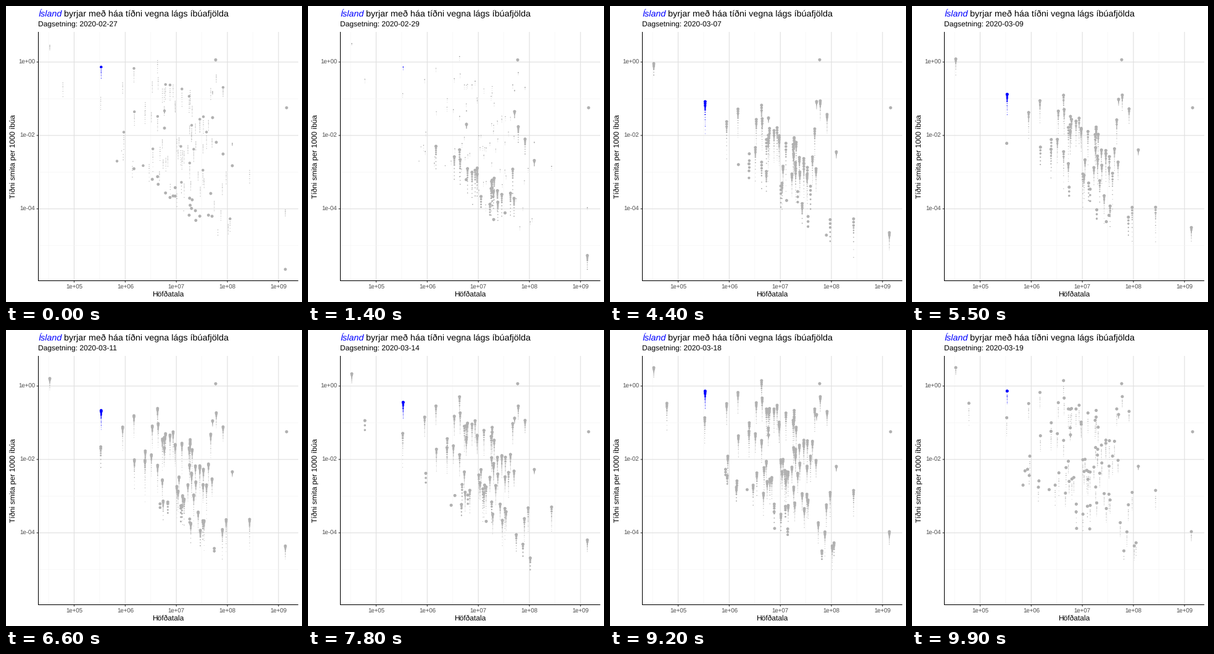
Write a matplotlib script that moves like this. It is 480 px wide and 480 px high and loops after 10 s.

```python
import numpy as np
import matplotlib.pyplot as plt
from matplotlib.animation import FuncAnimation

plt.rcParams["text.hinting"] = "none"
rng = np.random.default_rng(19)

W, DPI, FRAMES = 480, 100, 100
PT = 72 / DPI
GREY, BLUE = "#b1b1b1", "#0000ff"

# Plot area and scales: pixels per power of ten
L, R, T, B = 52.5, 474, 42, 445.5
X5, XSTEP = 110.5, 82.85
Y0, YSTEP = 90.9, 59.5

# Wake: length in frames, and the youngest age kept across the restart
WAKE, OLD = 25, 11
DAYS, COUNTRIES, EASE = 21, 82, 0.65

# Frames spent on each date: a hold, then a move to the next one
SPANS = [6, 6, 5, 5, 5, 4, 4, 5, 4, 5, 4, 5, 5, 5, 4, 4, 4, 4, 4, 4, 5, 4]
STARTS = np.cumsum([0] + SPANS[:-1])


def clock(n):
    """Day of a frame and how far it has moved to the next day."""
    day = np.searchsorted(STARTS, n, side="right") - 1
    return day, max(0, n - STARTS[day] - 2) / (SPANS[day] - 2)


def track(x, first, low, high):
    """Column x and its heights for all frames, NaN before the first day."""
    def height(day):
        u = np.clip((day - first) / max(1, DAYS - 1 - first), 0, 1)
        return low + (high - low) * u ** EASE

    path = np.full(FRAMES, np.nan)
    for n in range(FRAMES):
        day, part = clock(n)
        if day >= first:
            restart = day == DAYS and first == 0
            a, b = height(day), low if restart else height(day + 1)
            path[n] = a + (b - a) * part
    return x, path


def country(first):
    """A random population whose case count grows from the first day on."""
    x = np.clip(rng.normal(287 - 1.6 * first, 34 + 1.9 * first), 76, 395)
    one_case = Y0 + YSTEP * (2 + (x - X5) / XSTEP)
    low = one_case - YSTEP * rng.uniform(0, 0.6)
    decades = 0.14 * max(0, DAYS - 1 - first) * rng.uniform(0.7, 1.25)
    return track(x, first, low, low - YSTEP * decades)


# Best-known columns: x, first day, height then and at the end
LEADERS = [
    (340, 0, 87.5, 87), (455, 0, 165, 165), (335, 0, 181, 137),
    (341, 0, 221, 108), (352, 0, 240, 132), (453, 0, 427, 327),
    (332, 0, 304, 128), (367, 0, 259, 221), (257, 0, 198, 170),
    (271, 0, 308, 122), (71, 6, 112, 61),
]
greys = [track(*row) for row in LEADERS]
for first in np.linspace(-5, DAYS, COUNTRIES):
    greys.append(country(max(0, round(first))))
blues = [track(154.3, 3, 213, 99)]


def radius(age):
    return 0.4 + 2.05 * (1 - age / WAKE) ** 3


def trail(tracks, n):
    """Points of a frame with their shrinking wake: positions, radii."""
    xs = np.array([x for x, _ in tracks], float)
    paths = np.array([path for _, path in tracks])
    spots, radii = [], []

    def add(xs, ys, r):
        ok = ~np.isnan(ys)
        spots.append(np.column_stack([xs[ok], ys[ok]]))
        radii.append(np.full(ok.sum(), r))

    for age in range(WAKE):
        restart = n < age or (n >= STARTS[-1] and age > 2)
        if not restart or age > OLD:
            add(xs, paths[:, (n - age) % FRAMES], radius(age))
    # some end points linger into the next loop
    if n < OLD:
        add(xs[::4], paths[::4, STARTS[-1]], radius(1 + 2 * n))
    return np.vstack(spots), np.concatenate(radii)


fig = plt.figure(figsize=(W / DPI, W / DPI), dpi=DPI, facecolor="white")
ax = fig.add_axes([0, 0, 1, 1])
ax.set(xlim=(0, W), ylim=(W, 0))
ax.axis("off")


def line(xs, ys, color, width=1.07, z=1):
    ax.plot(xs, ys, color=color, lw=width * PT, zorder=z,
            solid_capstyle="butt", snap=False)


def label(x, y, s, px, **kw):
    kw = {"va": "baseline", **kw}
    return ax.text(x, y, s, fontsize=px * PT, family="Liberation Sans", **kw)


MAJOR, MINOR, TICK, TEXT = "#dedede", "#f4f4f4", "#333333", "#4d4d4d"
for i in range(5):
    x = X5 + i * XSTEP
    line([x - XSTEP / 2] * 2, [T, B], MINOR, 0.6)
    line([x, x], [T, B], MAJOR)
    line([x, x], [B, B + 3], TICK, z=4)
    label(x, 458.5, f"1e+0{i + 5}", 9.6, color=TEXT, ha="center")
for i, name in enumerate(["1e+00", "1e-02", "1e-04"]):
    y = Y0 + 2 * i * YSTEP
    line([L, R], [y + YSTEP] * 2, MINOR, 0.6)
    line([L, R], [y, y], MAJOR)
    line([L - 3, L], [y, y], TICK, z=4)
    label(47, y + 3.5, name, 9.6, color=TEXT, ha="right")
line([L, L], [T, B + 0.5], "black", z=4)
line([L - 0.5, R], [B, B], "black", z=4)

label(52, 17, "Ísland", 14.4, color=BLUE, style="italic")
label(94.5, 17, "byrjar með háa tíðni vegna lágs íbúafjölda", 14.4)
date = label(52, 34, "", 12)
label(263, 472, "Höfðatala", 12, ha="center")
label(12, 244, "Tíðni smita per 1000 íbúa", 12, rotation=90,
      ha="center", va="center")

grey_dots = ax.scatter([], [], color=GREY, linewidths=0, zorder=2)
blue_dots = ax.scatter([], [], color=BLUE, linewidths=0, zorder=3)


def update(n):
    for dots, tracks in [(grey_dots, greys), (blue_dots, blues)]:
        spots, radii = trail(tracks, n)
        dots.set_offsets(spots)
        dots.set_sizes((2 * radii * PT) ** 2)
    day = np.datetime64("2020-02-27") + int(clock(n)[0])
    date.set_text(f"Dagsetning: {day}")
    return grey_dots, blue_dots, date


anim = FuncAnimation(fig, update, frames=FRAMES, interval=100,
                     repeat=True, repeat_delay=0)
plt.show()
```
